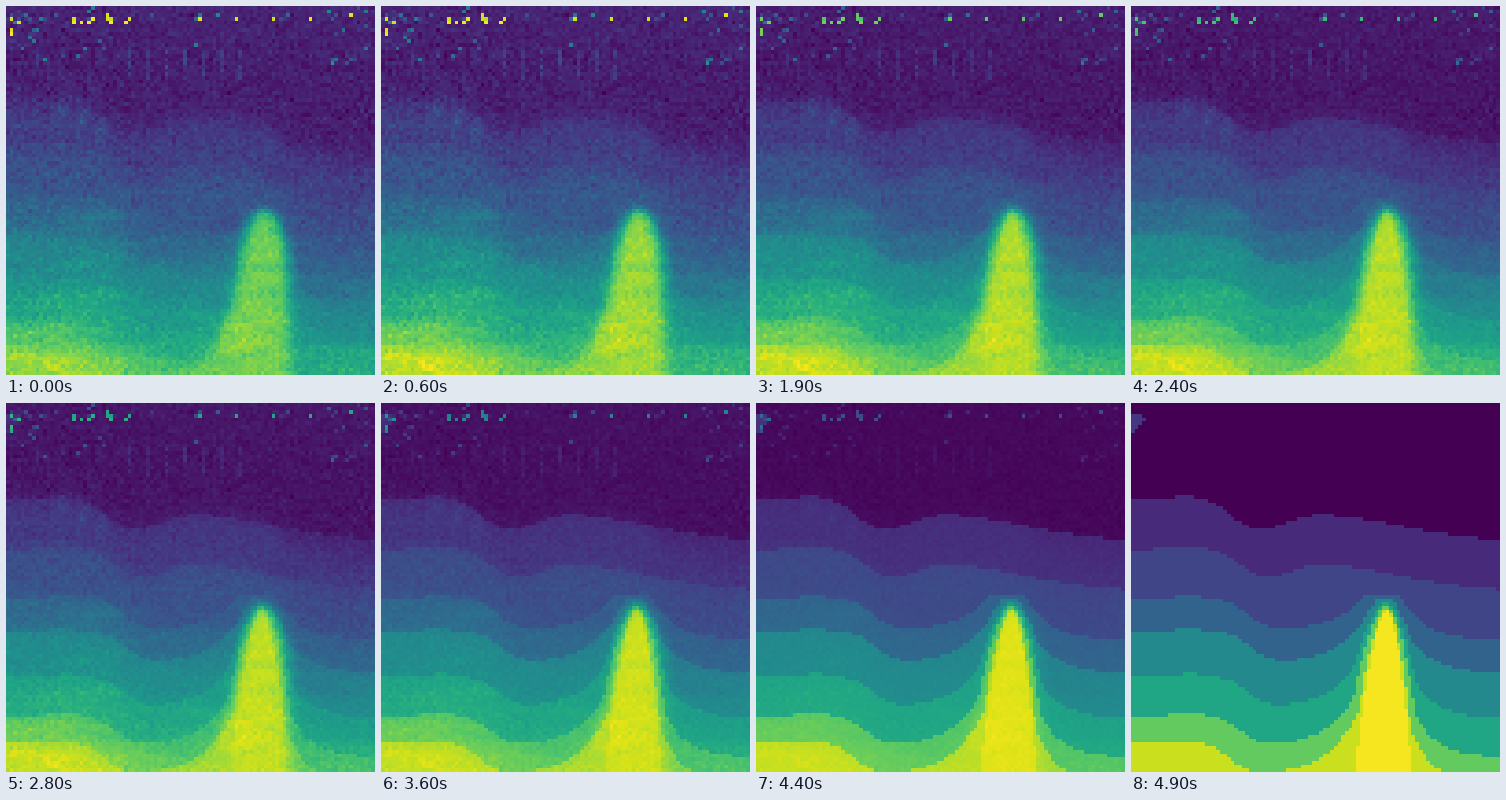
Write a matplotlib script that moves like this. It is 369x369 px and loops after 5 s.

```python
import numpy as np
import matplotlib.pyplot as plt
from matplotlib.animation import FuncAnimation

SIZE, CELLS, FRAMES, INTERVAL = 369, 100, 50, 100
rng = np.random.default_rng(7)

centers = (np.arange(CELLS) + 0.5) * SIZE / CELLS
X, Y = np.meshgrid(centers, centers)

LAYER_TOPS = [96, 146, 196, 229, 274, 313, 341]
LAYER_VALUES = [0, 0.12, 0.21, 0.32, 0.47, 0.59, 0.76, 0.92]
SALT_X, SALT_TOP, SALT_VALUE = 256, 207, 0.985


def sigmoid(v):
    return 1 / (1 + np.exp(-np.clip(v, -40, 40)))


def salt_flank(top=SALT_TOP, widen=1.0):
    """Depth of a spire whose half-width grows as a power of depth."""
    offset = centers - SALT_X
    half_width = np.where(offset < 0, 32, 25) * widen
    return top + (SIZE - SALT_TOP) * (np.abs(offset) / half_width) ** 1.75


def undisturbed_interface(k):
    """Left shelf, a step down, then a gentle slope to the right."""
    step_x = 100 + 20 * np.sin(np.pi * k / 6)
    depth = LAYER_TOPS[k] + 33 * sigmoid((centers - step_x) / 10)
    depth += 0.04 * np.maximum(centers - 150, 0)
    depth -= 3 * np.exp(-((centers - 58) / 22) ** 2)
    if k < 2:
        spread = np.where(centers < 190, 28, 75)
        depth -= 19 * np.exp(-0.5 * ((centers - 190) / spread) ** 2)
    return depth


def interface(k):
    """Layers below the second one are dragged up along the salt."""
    depth = undisturbed_interface(k)
    if k < 2:
        return depth
    offset = centers - SALT_X
    reach = np.where(offset < 0, 32, 21)
    depth -= 0.6 * (LAYER_TOPS[k] - 62) * np.exp(-np.abs(offset) / reach)
    top = 191 + 3.75 * (k - 2)
    return np.minimum(np.maximum(depth, top), salt_flank(top, 1.15 + 0.3 * (6 - k)))


def sharp_model():
    model = np.zeros((CELLS, CELLS))
    for k, value in enumerate(LAYER_VALUES[1:]):
        model[Y > interface(k)] = value
    model[Y > salt_flank()] = SALT_VALUE
    model[(X < 15 - 1.2 * np.abs(Y - 17)) & (Y > 10)] = 0.16
    return model


def blurred_model():
    model = 0.035 * np.exp(-Y / 40)
    for k, jump in enumerate(np.diff(LAYER_VALUES)):
        depth = undisturbed_interface(k) + 20 * sigmoid((centers - 275) / 8)
        model += jump * sigmoid((Y - depth) / 7)
    # Rounded finger with a left-leaning foot
    drop = np.maximum(Y - 198, 0)
    bulge = 1 - np.exp(-drop / 22)
    left = 258 - 25 * bulge - 45 * (drop / 171) ** 3
    right = 258 + 26 * bulge
    body = sigmoid(np.minimum(X - left, right - X) / 4) * sigmoid((Y - 203) / 3)
    return model + body * (0.84 - model)


def smooth(field, sigmas):
    for axis, sigma in enumerate(sigmas):
        t = np.arange(-3 * sigma, 3 * sigma + 1)
        kernel = np.exp(-t**2 / (2 * sigma**2))
        field = np.apply_along_axis(np.convolve, axis, field, kernel, "same")
    return field / field.std()


def artefacts():
    def white():
        return rng.normal(0, 1, (CELLS, CELLS))

    noise = 0.031 * np.clip(white(), -3.2, 3.2) * (1 + 0.25 * sigmoid((110 - X) / 20))
    noise += 0.02 * smooth(white(), (1, 4)) * sigmoid((Y - 190) / 15)
    for i in range(3):
        x, y = 57 + 19 * i, 106 + 9 * i
        noise += 0.1 * np.exp(-((X - x) ** 2 / 30 + (Y - y) ** 2 / 60))
    noise[11:20, 33:64:5] += rng.uniform(0.0, 0.15, (9, 7))
    # Dim specks, denser near the upper corners
    density = 0.07 * np.exp(-X / 70) + 0.03 * sigmoid((X - 300) / 12)
    specks = (rng.random((CELLS, CELLS)) < density) & (Y < 60)
    specks[2:4] |= rng.random((2, CELLS)) < 0.08
    return noise + specks * rng.uniform(0.1, 0.45, (CELLS, CELLS))


def add_bright_dots(field):
    row = slice(3, 4)
    next_row = slice(4, 5)
    for rows, cols in [
        (row, slice(52, 83, 10)), (row, slice(18, 34, 5)), (row, slice(1, 2)),
        (next_row, slice(18, 23, 2)), (next_row, slice(28, 33, 4)),
        (next_row, slice(3, 4)), (slice(2, 4), slice(27, 28)),
        (slice(6, 8), slice(1, 2)), (slice(2, 3), slice(93, 94)),
    ]:
        field[rows, cols] = rng.uniform(0.98, 1.1, field[rows, cols].shape)


sharp = sharp_model()
start = blurred_model() + artefacts()
add_bright_dots(start)

fig = plt.figure(figsize=(SIZE / 100, SIZE / 100), dpi=100)
ax = fig.add_axes([0, 0, 1, 1])
ax.axis("off")
image = ax.imshow(start, cmap="viridis", interpolation="nearest", aspect="auto")


def update(frame):
    weight = (1 - frame / (FRAMES - 1)) ** 0.68
    field = sharp + weight * (start - sharp)
    image.set_data(field)
    image.set_clim(field.min(), max(1, field.max()))
    return [image]


anim = FuncAnimation(fig, update, frames=FRAMES, interval=INTERVAL,
                     repeat=True, repeat_delay=0)
plt.show()
```
